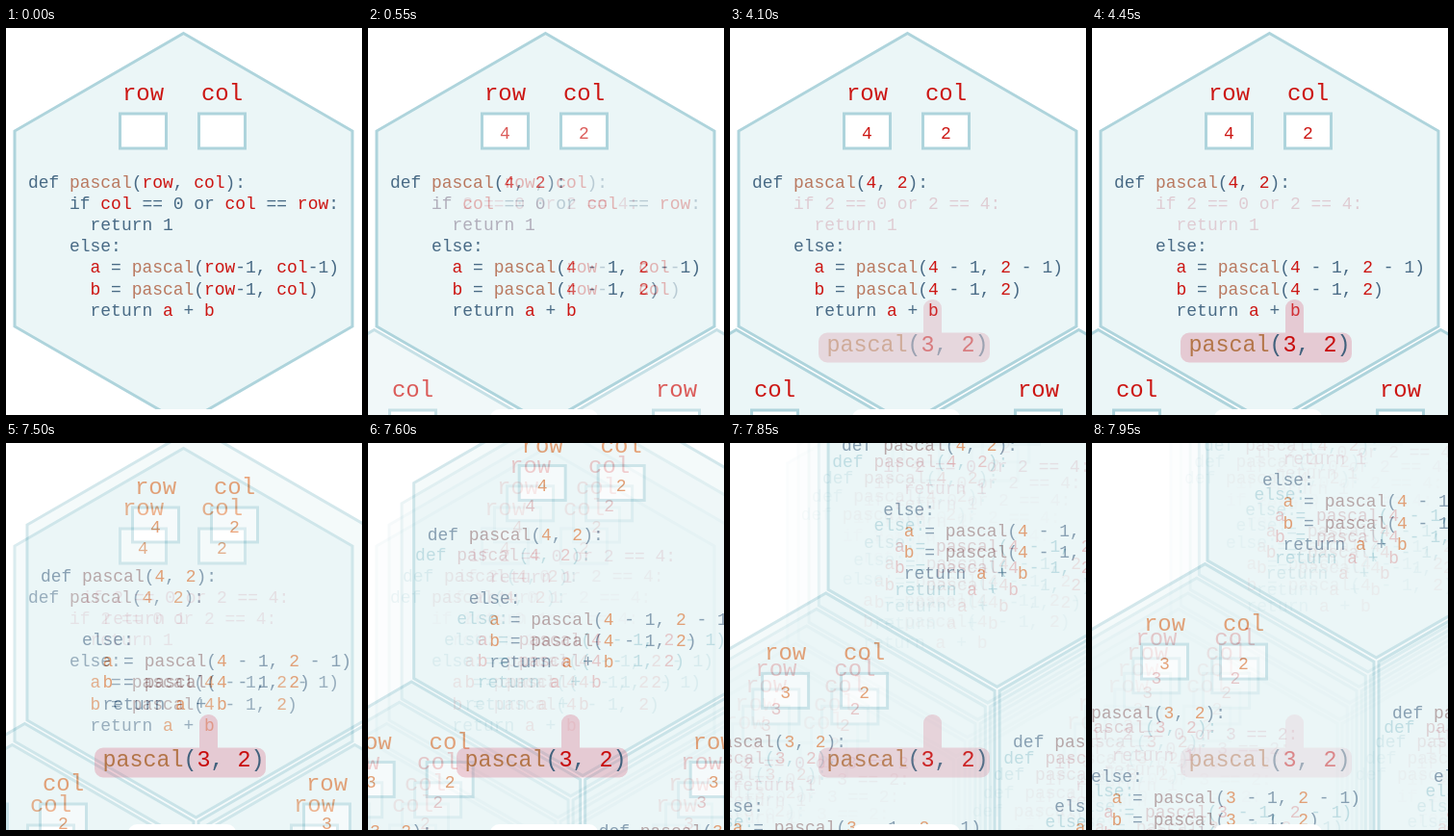
An HTML page with a canvas for the animation above (8 s loop, 370 by 402 pixels).

```html
<!DOCTYPE html>
<html lang="en">
<head>
<meta charset="utf-8">
<title>Recursive calls</title>
<style>
  html, body { margin: 0; width: 100%; height: 100%; overflow: hidden; background: #fff; }
  canvas { display: block; width: 370px; height: 402px; }
</style>
</head>
<body>
<canvas id="stage" width="370" height="402"></canvas>
<script>
const W = 370, H = 402, LOOP = 8000, STEP = 50;
const FILL_AT = 500, POPUP_AT = 4100, PAN_AT = 7500;
const CHILD_X = 178, CHILD_Y = 308;

const makeLayer = () => Object.assign(document.createElement('canvas'), { width: W, height: H });
const stage = document.getElementById('stage').getContext('2d');
const layer = makeLayer().getContext('2d');

const font = size => `${size}px "Liberation Mono", "Courier New", monospace`;
const CALM = { ink: '#486a85', accent: '#cc1512', call: '#b9785f', faint: '#dfccd3', edge: '#aed4dc' };
const MOVING = { ...CALM, ink: '#36597a', accent: '#d9590c', call: '#8c6567' };
const GHOST = { ...CALM, ink: '#3d95a8', accent: '#d0383c', call: '#b3606a' };

const CODE = [
  'def pascal(R, C):',
  '    if C == 0 or C == R:',
  '      return 1',
  '    else:',
  '      a = pascal(R-1, C-1)',
  '      b = pascal(R-1, C)',
  '      return a + b'
];

const ROOT = { x: 0, y: 0, row: '4', col: '2' };
const CHILDREN = [
  { x: -CHILD_X, y: CHILD_Y, row: '3', col: '2', test: '    if C == 0 or R == C:' },
  { x: CHILD_X, y: CHILD_Y, row: '3', col: '1' }
];

// Draws monospaced text, colouring variables and function names.
function codeLine(g, line, x, y, size, colors, names, solid) {
  g.font = font(size);
  g.textAlign = 'left';
  const advance = g.measureText('0').width;
  let column = 0;
  for (const part of line.split(/(\b[RCab]\b|pascal)/)) {
    const text = names[part] || part;
    const color = part === 'pascal' ? colors.call : /^[RCab]$/.test(part) ? colors.accent : colors.ink;
    g.fillStyle = solid || color;
    g.fillText(text, x + column * advance, y);
    column += text.length;
  }
}

function hexagon(g, colors) {
  g.beginPath();
  [[184.5, 5.5], [360, 107], [360, 310], [184.5, 411], [9, 310], [9, 107]]
    .forEach(([x, y]) => g.lineTo(x, y));
  g.closePath();
  g.fillStyle = '#ebf6f7';
  g.fill();
  g.strokeStyle = colors.edge;
  g.lineWidth = 3;
  g.stroke();
}

function field(g, label, value, x, colors) {
  g.textAlign = 'center';
  g.fillStyle = colors.accent;
  g.font = font(24);
  g.fillText(label, x, 75);
  g.fillStyle = '#fff';
  g.strokeStyle = colors.edge;
  g.fillRect(x - 24, 89, 48, 36);
  g.strokeRect(x - 24, 89, 48, 36);
  g.fillStyle = colors.accent;
  g.font = font(18);
  g.fillText(value, x, 115);
}

function card(g, node, filled, colors) {
  g.save();
  g.translate(node.x, node.y);
  hexagon(g, colors);
  field(g, 'row', filled ? node.row : '', 142.5, colors);
  field(g, 'col', filled ? node.col : '', 224.5, colors);
  const names = filled ? { R: node.row, C: node.col } : { R: 'row', C: 'col' };
  CODE.forEach((template, i) => {
    let line = i === 1 && node.test || template;
    if (filled) line = line.replace(/-/g, ' - ');
    const skipped = filled && (i === 1 || i === 2);
    codeLine(g, line, 23, 166 + i * 22.1, 17.95, colors, names, skipped && colors.faint);
  });
  g.restore();
}

// Composites one complete scene over what is already on the stage.
function scene(filled, shift, alpha, colors) {
  layer.fillStyle = '#fff';
  layer.fillRect(0, 0, W, H);
  layer.save();
  layer.translate(shift, -1.693 * shift);
  if (filled) CHILDREN.forEach(node => card(layer, node, true, colors));
  card(layer, ROOT, filled, colors);
  layer.restore();
  stage.globalAlpha = alpha;
  stage.drawImage(layer.canvas, 0, 0);
  stage.globalAlpha = 1;
}

function popup(boxAlpha, textAlpha) {
  stage.globalAlpha = boxAlpha;
  stage.fillStyle = 'rgba(214, 100, 125, 0.3)';
  stage.beginPath();
  stage.roundRect(92, 316.5, 178, 31, 9);
  stage.roundRect(201, 282, 19, 34.5, [9, 9, 0, 0]);
  stage.fill();
  stage.globalAlpha = textAlpha;
  codeLine(stage, 'pascal(R, C)', 100.5, 336, 23.35,
    { ink: '#40617c', accent: '#c80d0d', call: '#b37548' }, { R: '3', C: '2' });
  stage.globalAlpha = 1;
}

const stepsSince = (t, start) => Math.floor((t - start) / STEP) + 1;
const settle = (steps, rest) => steps >= 8 ? 1 : 1 - rest ** steps;
const panShift = n => n < 0 ? 0 : 13 + 13.39 * n - 0.278 * n * n;

function pan(n) {
  scene(true, panShift(n - 4), 1, GHOST);
  for (let i = n - 3; i < n; i++) scene(true, panShift(i), 0.54, i === n - 1 && n === 0 ? MOVING : GHOST);
  if (n === 0) scene(true, 0, 1, MOVING);
  scene(true, panShift(n), 0.54, MOVING);
  const fade = n < 7 ? 1 : 1 - (n - 6) * 0.22;
  popup(fade, Math.min(1, fade + 0.1));
}

function draw(t) {
  if (t >= PAN_AT) {
    pan(Math.min(9, stepsSince(t, PAN_AT) - 1));
  } else {
    const mix = t < FILL_AT ? 0 : settle(stepsSince(t, FILL_AT), 0.55);
    if (mix < 1) scene(false, 0, 1, CALM);
    if (mix > 0) scene(true, 0, mix, CALM);
    if (t >= POPUP_AT) {
      const steps = stepsSince(t, POPUP_AT);
      popup(settle(steps, 0.3), settle(steps, 0.55));
    }
  }
  stage.fillStyle = '#fff';
  stage.beginPath();
  stage.roundRect(127, 396, 112, 30, 9);
  stage.fill();
}

const start = performance.now();
let shown = -1;
function tick() {
  const step = Math.floor((performance.now() - start) % LOOP / STEP);
  if (step !== shown) draw((shown = step) * STEP);
  requestAnimationFrame(tick);
}
draw(0);
tick();
</script>
</body>
</html>
```
